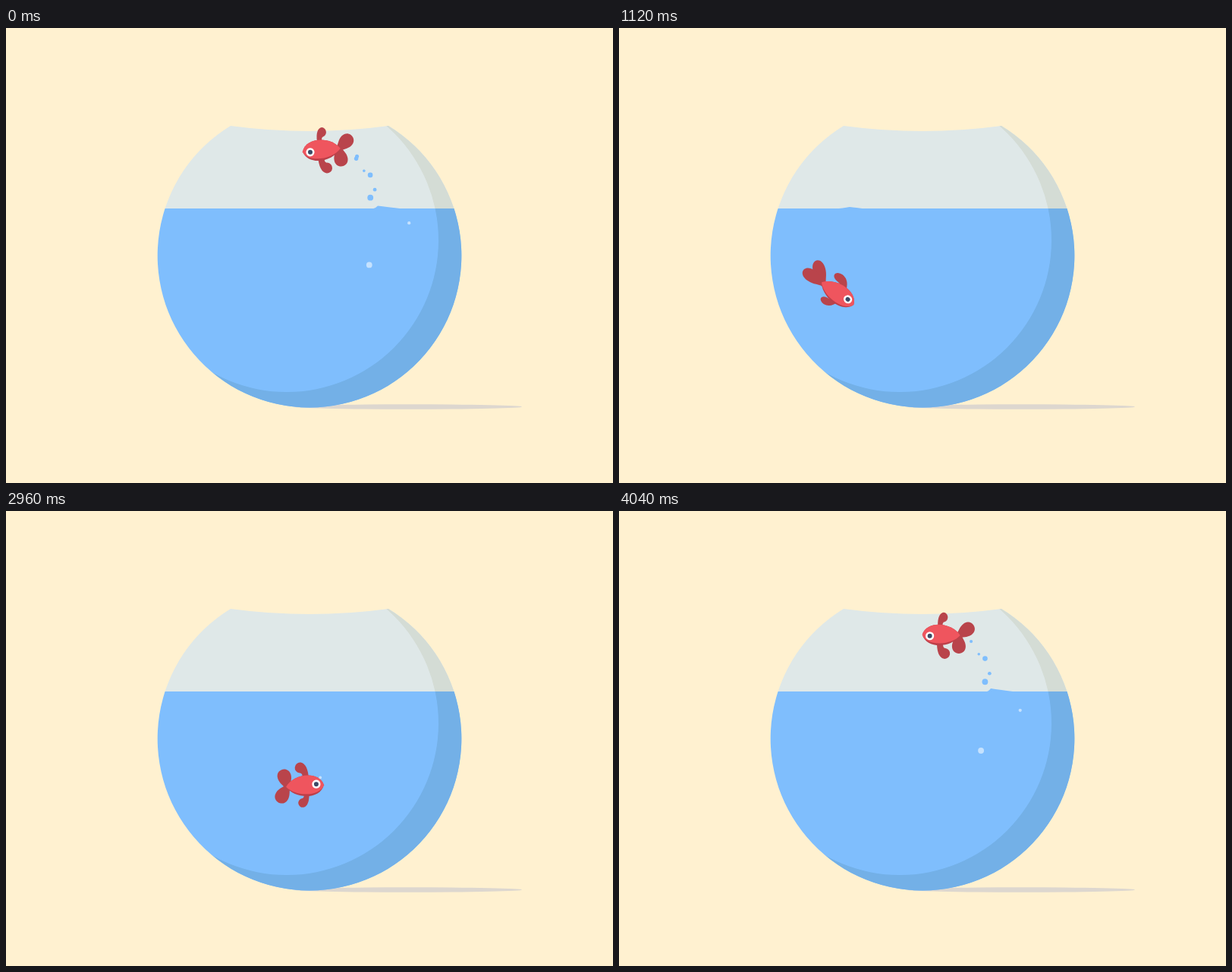
Recreate the animation shown at these times as an HTML page with a canvas. Size 800 by 600 pixels, loop 4080 ms.

```html
<!DOCTYPE html>
<html>
<head>
<meta charset="utf-8">
<title>Fish bowl</title>
<style>
html, body { margin: 0; width: 100%; height: 100%; overflow: hidden; background: #fff1d0; }
canvas { display: block; }
</style>
</head>
<body>
<canvas id="stage" width="800" height="600"></canvas>
<script>
const c = document.getElementById('stage').getContext('2d');
const LOOP = 4080, SURFACE = 238, RAD = Math.PI / 180;
const WATER = '#7fbefd', FOAM = 'rgba(255,255,255,.55)', DARK = '#b9444b';

// key points of the swim: time, x, y, heading in degrees
const path = [
  [0, 416, 161, 175], [320, 361, 156, 152], [680, 311, 201, 102], [900, 290, 268, 75],
  [1120, 288, 350, 35], [1640, 375, 364, -4], [2240, 391.5, 363, -4], [2960, 394, 362.5, -3],
  [3360, 415, 361, -12], [3680, 498, 270, -87], [3880, 465, 188, -140]
];

// particles shed along the path; pairs run from the first particle to the last
const drops = { start: 3815, gap: 45, count: 12, life: 1150, ahead: [-37, -37], side: [0, 0],
  vx: [-.055, -.075], vy: [-.06, .1], r: [3.9, 1.4], jitter: 12, gravity: 4.2e-5 };
const dive = { start: 1120, gap: 58, count: 9, life: 1500, ahead: [15, 15], side: [-10, -10],
  vx: [0, .06], vy: [-.05, -.12], r: [2.2, 1.5], jitter: 14, gravity: 0 };
const mouth = { start: 2900, gap: 0, count: 1, life: 1080, ahead: [22, 22], side: [-5, -5],
  vx: [-.008, 0], vy: [-.083, 0], r: [1.9, 1.9], jitter: 0, gravity: 0 };
const leap = { start: 3560, gap: 60, count: 2, life: 1050, ahead: [-48, -25], side: [16, 24],
  vx: [.042, .062], vy: [-.09, -.14], r: [4, 1], jitter: 0, gravity: 0 };

const clamp = (v, low = 0, high = 1) => Math.max(low, Math.min(high, v));
const mix = ([a, b], u) => a + (b - a) * u;
const scatter = (i, k) => i * k % 1;

function key(i) {
  const n = path.length, turn = Math.floor(i / n), [t, x, y, heading] = path[i - turn * n];
  return [t + turn * LOOP, x, y, heading - turn * 360];
}

// smooth curve through the key points: x, y, heading
function pose(t) {
  let i = -3;
  while (key(i + 1)[0] <= t) i++;
  const [a, b, d, e] = [-1, 0, 1, 2].map(k => key(i + k));
  const h = d[0] - b[0], u = (t - b[0]) / h, v = 1 - u;
  return [1, 2, 3].map(k => {
    const m = (d[k] - a[k]) / (d[0] - a[0]) * h, n = (e[k] - b[k]) / (e[0] - b[0]) * h;
    return b[k] * v * v * (1 + 2 * u) + m * u * v * v + d[k] * u * u * (3 - 2 * u) - n * u * u * v;
  });
}

function local(draw) {
  c.save();
  draw();
  c.restore();
}

function dot(x, y, r, color) {
  c.fillStyle = color;
  c.beginPath();
  c.arc(x, y, r, 0, 7);
  c.fill();
}

function emit(e, t, color, visible) {
  for (let i = 0; i < e.count; i++) {
    const birth = e.start + i * e.gap, age = (t - birth + 2 * LOOP) % LOOP;
    if (age > e.life) continue;
    const u = e.count > 1 ? i / (e.count - 1) : 0;
    const [fx, fy, heading] = pose(birth);
    const cos = Math.cos(heading * RAD), sin = Math.sin(heading * RAD);
    const ahead = mix(e.ahead, u), side = mix(e.side, u);
    const x = fx + ahead * cos - side * sin + (scatter(i, .755) - .5) * e.jitter + mix(e.vx, u) * age;
    const y = fy + ahead * sin + side * cos + (scatter(i, .57) - .5) * e.jitter
      + mix(e.vy, u) * age + e.gravity * age * age;
    const r = mix(e.r, scatter(i, .618)) * clamp(age / 60) * (1 - (age / e.life) ** 5);
    if (visible(y)) dot(x, y, r, color);
  }
}

function bowl(t) {
  c.fillStyle = '#fff1d0';
  c.fillRect(0, 0, 800, 600);
  c.fillStyle = '#ddd7cf';
  c.beginPath();
  c.ellipse(530, 499.5, 150, 3.3, 0, 0, 7);
  c.fill();
  const glass = new Path2D('M296 129Q400 143 504 129A200.3 200.3 0 1 1 296 129Z');
  const shade = new Path2D('M0 0H800V600H0ZM570 280A200 200 0 1 1 170 280A200 200 0 1 1 570 280Z');
  const layer = (top, height, base, dim) => local(() => {
    c.beginPath();
    c.rect(0, top, 800, height);
    c.clip();
    c.fillStyle = base;
    c.fill(glass);
    c.clip(glass);
    c.fillStyle = dim;
    c.fill(shade, 'evenodd');
  });
  layer(0, SURFACE, '#dfe8e8', '#d4dcd5');
  layer(SURFACE, 600, WATER, '#73b0e7');
  swell(t, 740, 305, 20, 20, 4);
  swell(t, 3700, 491, 8, 32, 7);
}

// a wave that jumps up where the fish breaks the surface, then settles
function swell(t, start, x, left, right, height) {
  const p = (t - start + LOOP) % LOOP / 140, h = height * p * Math.exp(1 - p);
  if (h < .2) return;
  c.fillStyle = WATER;
  c.beginPath();
  c.moveTo(x - left, SURFACE + .5);
  c.quadraticCurveTo(x - left / 2, SURFACE, x - 1, SURFACE - h);
  c.quadraticCurveTo(x + right / 3, SURFACE - h * .6, x + right, SURFACE + .5);
  c.fill();
}

function lobe(angle, len, half) {
  local(() => {
    c.rotate(angle);
    c.beginPath();
    c.moveTo(3, -3);
    c.bezierCurveTo(-.15 * len, -4, -.3 * len, -half, -.6 * len, -half);
    c.bezierCurveTo(-1.13 * len, -half, -1.13 * len, half, -.6 * len, half);
    c.bezierCurveTo(-.3 * len, half, -.15 * len, 4, 3, 3);
    c.fill();
  });
}

const finShape = new Path2D('M4 3Q1 -18 -9 -19A7 7 0 0 0 -9 -5Q-5 -6 -4 3Z');
function fin(x, y, sx, sy, angle) {
  local(() => {
    c.translate(x, y);
    c.scale(sx, sy);
    c.rotate(angle);
    c.fill(finShape);
  });
}

function body(top, bottom, color) {
  c.fillStyle = color;
  c.beginPath();
  c.moveTo(-25, 0);
  c.bezierCurveTo(-14, -17 * top, 19, -19.5 * top, 25, 0);
  c.bezierCurveTo(19, 19.5 * bottom, -14, 17 * bottom, -25, 0);
  c.fill();
}

function fish(t) {
  const [x, y, heading] = pose(t);
  const roll = clamp(1.4 * Math.cos((heading + 20) * RAD), -1, 1);
  const fold = clamp((1 - Math.abs(roll)) * 4), left = clamp(-roll);
  const lag = (pose(t - 110)[2] - heading) * RAD;
  const hover = clamp((t - 2300) / 500) * clamp((3400 - t) / 300);
  local(() => {
    c.translate(x, y);
    c.rotate(heading * RAD);
    c.fillStyle = DARK;
    local(() => {
      c.translate(-23, 0);
      c.rotate(lag + .16 * hover);
      const spread = (62 - 54 * fold + 4 * hover) * RAD;
      lobe(spread, 24 + 10 * fold, 9 - fold);
      lobe(-spread, 24 + 10 * fold, 9 - fold);
    });
    local(() => {
      c.scale(1 + .35 * fold, roll);
      fin(2, -11, 1 - .2 * left, 1 - .1 * left, .25 * left + .15 * hover);
      fin(2, 11, .85 + .15 * left, -.85 - .15 * left, .15 * left + .15 * hover);
    });
    c.scale(1 + .04 * fold, 1 - .07 * fold);
    body(1, 1, '#bd3f49');
    body(1 - .2 * left, 1 - .2 * clamp(roll), '#ef555e');
    dot(15, -1.5, 5.6, '#fff');
    dot(15, -1.5, 3, '#3b4a66');
  });
}

function frame(now) {
  const t = now % LOOP;
  bowl(t);
  emit(drops, t, WATER, y => y < SURFACE + 1);
  fish(t);
  for (const e of [dive, mouth, leap]) emit(e, t, FOAM, y => y > SURFACE + 2);
  requestAnimationFrame(frame);
}
frame(0);
</script>
</body>
</html>
```
